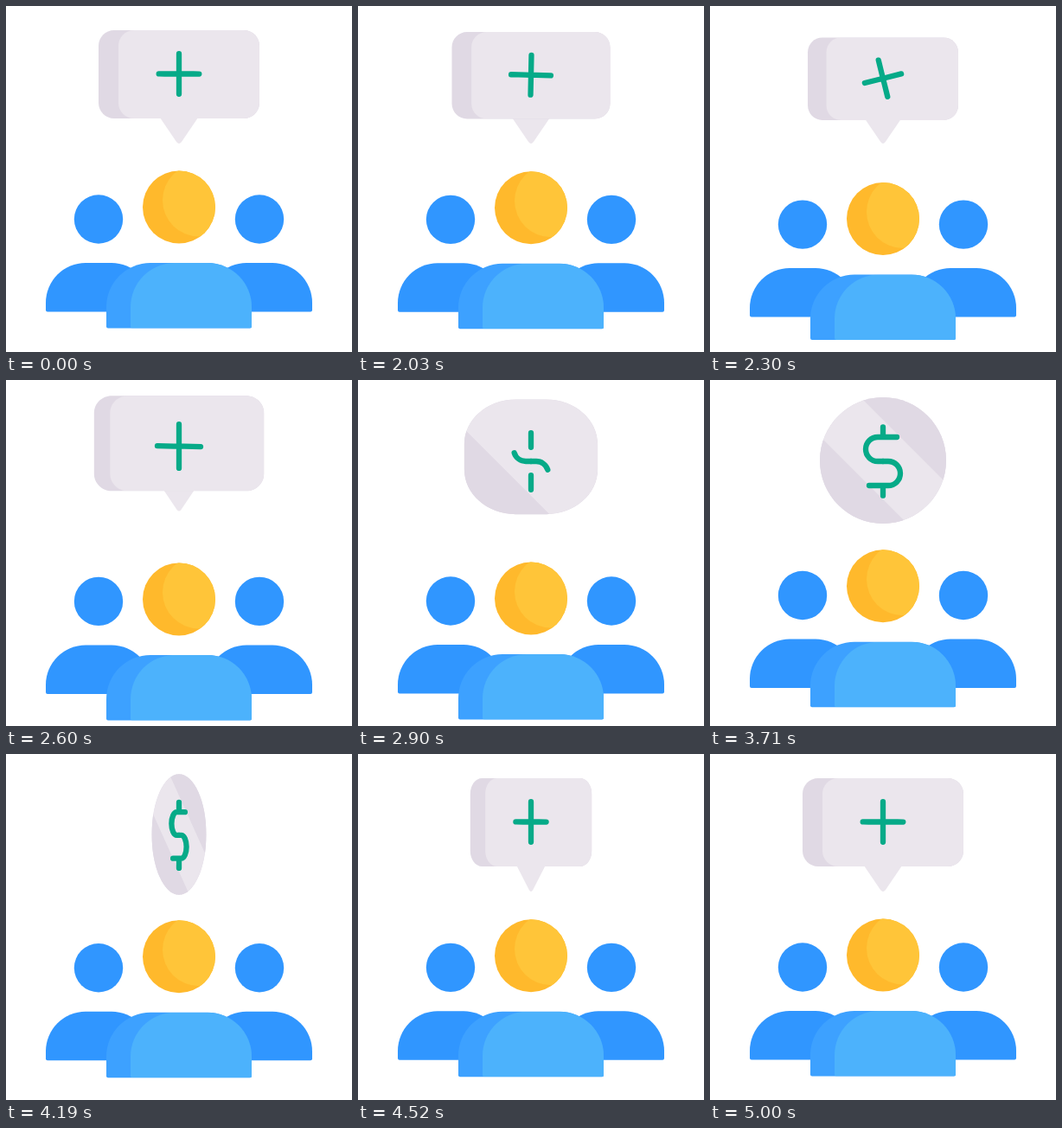
An HTML page for the animation above (5030 ms loop, 400 px wide and 400 px high).

```html
<!DOCTYPE html>
<html lang="en">
<head>
<meta charset="utf-8">
<title>Team funding</title>
<style>
  html, body { margin: 0; width: 100%; height: 100%; overflow: hidden; background: #fff; }
  svg { display: block; width: 100vw; height: 100vh; }
  .side { fill: #3096ff; }
  .side circle { fill: #ffae21; }
  .light { fill: #ebe6ed; }
  .dark { fill: #e0d9e4; }
  #glyph { fill: none; stroke: #06aa88; stroke-width: 6.3; stroke-linecap: round; stroke-linejoin: round; }
  #glyph path { vector-effect: non-scaling-stroke; }
</style>
</head>
<body>
<svg viewBox="0 0 400 400">
  <defs>
    <clipPath id="headClip"><circle cx="200" cy="232.5" r="42"/></clipPath>
    <path id="torso" d="M118 372.5q-2 0-2-2V348a51 51 0 0 1 51-51H233a51 51 0 0 1 51 51V370.500q0 2-2 2z"/>
    <clipPath id="torsoClip"><use href="#torso"/></clipPath>
    <clipPath id="shellClip"><path id="shellMask"/></clipPath>
    <g id="person">
      <circle cx="107" cy="246.500" r="28.200"/>
      <path d="M48 353.500q-2 0-2-2V343a46 46 0 0 1 46-46H122a46 46 0 0 1 46 46V351.500q0 2-2 2z"/>
    </g>
  </defs>

  <g id="sides" class="side">
    <use href="#person"/>
    <use href="#person" transform="matrix(-1 0 0 1 400 0)"/>
  </g>

  <g id="leader">
    <circle cx="200" cy="232.500" r="42" fill="#ffb92c"/>
    <circle cx="223" cy="224.500" r="42" fill="#ffc539" clip-path="url(#headClip)"/>
    <use href="#torso" fill="#3da1ff"/>
    <g clip-path="url(#torsoClip)"><use href="#torso" x="28" fill="#4cb2fc"/></g>
  </g>

  <g id="sign">
    <path id="tail" class="light"/>
    <path id="shell" class="dark"/>
    <g clip-path="url(#shellClip)">
      <path id="face" class="light"/>
      <path id="lowBand" class="dark"/>
      <path id="highBand" class="dark"/>
    </g>
    <g id="glyph">
      <path id="half"/>
      <use href="#half" transform="rotate(180)"/>
    </g>
  </g>
</svg>

<script>
const LOOP = 5030, START = 2000, STEP = 30;
const $ = id => document.getElementById(id);
const set = (id, name, value) => $(id).setAttribute(name, value);
const lerp = (a, b, p) => a + (b - a) * p;
const ease = (t, from, to) => {
  const p = Math.min(1, Math.max(0, (t - from) / (to - from)));
  return (1 - Math.cos(Math.PI * p)) / 2;
};

// Smooth curve through [time, value] points
function track(pts) {
  const last = pts.length - 1;
  const slope = i => {
    const a = pts[Math.max(0, i - 1)], b = pts[Math.min(last, i + 1)];
    return (b[1] - a[1]) / (b[0] - a[0]);
  };
  return t => {
    if (t <= pts[0][0]) return pts[0][1];
    if (t >= pts[last][0]) return pts[last][1];
    const i = pts.findIndex(p => p[0] > t) - 1;
    const [t0, v0] = pts[i], [t1, v1] = pts[i + 1];
    const d = t1 - t0, u = (t - t0) / d, w = 1 - u;
    return w * w * (1 + 2 * u) * v0 + u * u * (3 - 2 * u) * v1
      + d * u * w * (w * slope(i) - u * slope(i + 1));
  };
}

const sink = track([[2000, 0], [2030, .8], [2300, 13.5], [2560, 20.4], [2700, 21],
  [2900, 20], [3110, 17.6], [3620, 7.2], [3710, 5.7], [4190, 1.8], [5000, 0]]);
const bounce = track([[2000, 1], [2030, .984], [2170, .92], [2300, .935],
  [2550, 1.076], [2800, 1], [2900, 1]]);

function roundBox(w, h, rx, ry, cy) {
  const k = .5523, cx = rx * k, c = ry * k, x = w - rx, y = h - ry;
  return `M${-x} ${cy - h}H${x}c${cx} 0 ${rx} ${ry - c} ${rx} ${ry}V${cy + y}`
    + `c0 ${c} ${cx - rx} ${ry} ${-rx} ${ry}H${-x}c${-cx} 0 ${-rx} ${c - ry} ${-rx} ${-ry}`
    + `V${cy - y}c0 ${-c} ${rx - cx} ${-ry} ${rx} ${-ry}z`;
}

// Half of the symbol: one tick and one arm that bends into half an S
function halfGlyph(inner, outer, length, bend) {
  const arc = Math.min(length - 6, 14 * Math.PI), rest = length - 6 - arc;
  const r = 14 / Math.max(bend, .005), a = arc / r;
  return `M0 ${-inner}V${-outer}M0 0H-6A${r} ${r} 0 0 1 ${-6 - r * Math.sin(a)} ${-r * (1 - Math.cos(a))}`
    + `l${-rest * Math.cos(a)} ${-rest * Math.sin(a)}`;
}

function drawSign(t) {
  const s = bounce(t);
  const round = ease(t, 2560, 3100);
  const tuck = 1 - ease(t, 2520, 2760);
  const w = lerp(93 * s, 73, round ** .64), h = lerp(51 * s, 73, round);
  const cy = lerp(159 - 80 * s, 93, round);
  const box = roundBox(w, h, lerp(18 * s, w, round), lerp(18 * s, h, round), cy);
  for (const id of ['shell', 'shellMask', 'face']) set(id, 'd', box);
  set('face', 'transform', `translate(${23 * s * tuck})`);

  const base = cy + h - 1, k = s * tuck;
  set('tail', 'd', `M${-22 * k} ${base}L${-3 * k} ${base + 28 * k}Q0 ${base + 32 * k} ${3 * k} ${base + 28 * k}L${22 * k} ${base}z`);

  const band = d => `M-200 ${cy - 200 + d}L200 ${cy + 200 + d}H-200z`;
  set('lowBand', 'd', band(lerp(170, 45, ease(t, 2600, 2880))));
  set('highBand', 'd', band(lerp(170, 47, ease(t, 2900, 3200))));
  set('highBand', 'transform', `rotate(180 0 ${cy})`);

  const split = ease(t, 2540, 3193), arm = 23.3 * s;
  const gy = lerp(159 - 80.5 * s, 94, ease(t, 2500, 2850));
  const turn = 90 * ease(t, 2000, 2405) % 90;
  set('glyph', 'transform', `translate(0 ${gy}) rotate(${turn})`);
  set('half', 'd', halfGlyph(28 * split, lerp(arm, 39.7, split),
    lerp(arm, 72, ease(t, 2880, 3250)), ease(t, 2560, 2880)));
}

function draw(now) {
  const t = START + Math.max(0, Math.floor((now % LOOP - START) / STEP) * STEP);
  const y = sink(t);
  set('leader', 'transform', `translate(0 ${y})`);
  set('sides', 'transform', `translate(0 ${y * .45})`);

  // The coin turns edge-on and comes back as the bubble
  const face = Math.cos(Math.PI * ease(t, 3700, 4900));
  const coin = face > 0;
  const sy = coin ? 1 - .103 * (1 - face) ** 1.5 : 1;
  drawSign(coin ? t : START);
  set('sign', 'transform', `translate(200 93) scale(${Math.max(.01, Math.abs(face))} ${sy}) translate(0 -93)`);
}

function tick() {
  draw(performance.now());
  requestAnimationFrame(tick);
}
tick();
</script>
</body>
</html>
```
